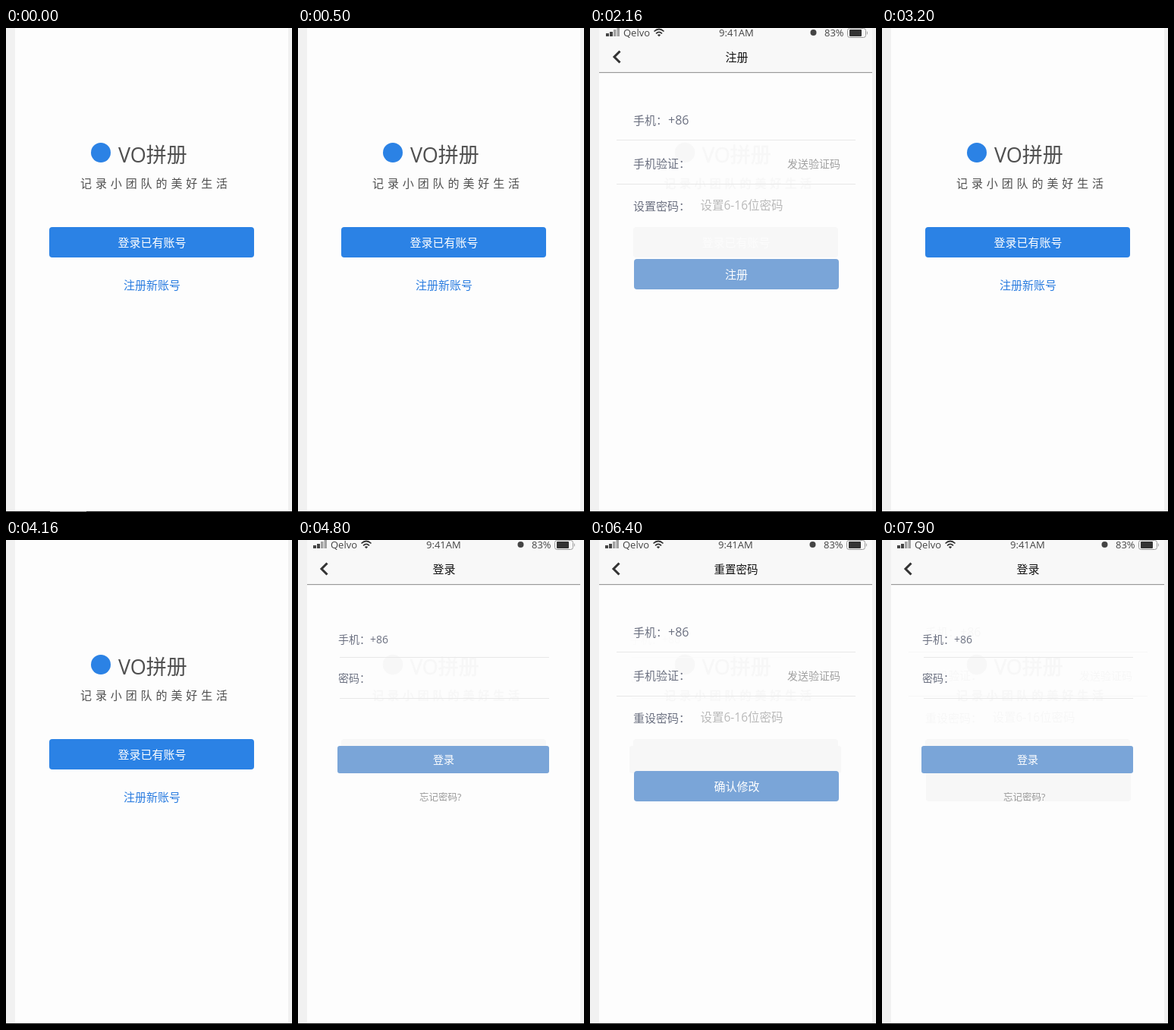
These frames come from a looping animation (377 px wide and 637 px high, 8 s). An HTML page:

```html
<!DOCTYPE html>
<html lang="zh-CN">
<head>
<meta charset="utf-8">
<title>账本</title>
<style>
  html, body { margin: 0; width: 100%; height: 100%; overflow: hidden; background: #f1f1f1; }
  svg { display: block; width: 377px; height: 637px; }
  text { font: 15px "Open Sans", "Noto Sans CJK SC", "Noto Sans CJK", sans-serif; }
  .mid { text-anchor: middle; }

  /* --g recolours a whole group as a faint afterimage */
  .ghost { --g: #f7f7f7; }
  .faint { --g: #fafafa; }
  .mark { fill: var(--g, #2b82e5); }
  .ink { fill: var(--g, #4f4f4f); }
  .brand { font-size: 27px; }
  .motto { letter-spacing: 4.9px; }
  .label { fill: var(--g, #6b7080); }
  .hint { fill: var(--g, #b9b9b9); }
  .code { fill: var(--g, #a0a0a0); font-size: 14px; }
  .rule { stroke: var(--g, #e8e8e8); }
  .soft { fill: var(--g, #7aa5d8); }
  .white { fill: #fff; }
  .title { fill: #111; text-anchor: middle; }
  .small { font-size: 13px; fill: #444; }
  .s14 { font-size: 14px; }

  .screen, .tab { visibility: hidden; animation: 8s step-end infinite; }
  #home { animation-name: home; }
  #register { animation-name: register; }
  #login { animation-name: login; }
  #reset { animation-name: reset; }
  .after { visibility: hidden; animation: after 8s step-end infinite; }
  .tab { animation-name: tab; }
  @keyframes home { 0%, 40% { visibility: visible } 7.5%, 60%, 100% { visibility: hidden } }
  @keyframes register { 0%, 40%, 100% { visibility: hidden } 7.5% { visibility: visible } }
  @keyframes login { 0%, 80% { visibility: hidden } 60%, 98.75%, 100% { visibility: visible } }
  @keyframes reset { 0%, 98.75%, 100% { visibility: hidden } 80% { visibility: visible } }
  @keyframes after { 0% { visibility: hidden } 98.75%, 100% { visibility: visible } }
  @keyframes tab { 0% { visibility: visible } 6.25%, 100% { visibility: hidden } }
</style>
</head>
<body>
<svg viewBox="0 0 377 637">
  <defs>
    <g id="brand">
      <circle class="mark" cx="125" cy="164" r="13"/>
      <text class="ink brand" x="148" y="177">VO拼册</text>
      <text class="ink motto" x="98" y="210">记录小团队的美好生活</text>
    </g>
    <rect id="enter" class="mark" x="57" y="262" width="270" height="40" rx="4"/>
    <g id="trace" class="ghost">
      <use href="#brand" stroke="#f7f7f7" stroke-width=".6"/>
      <use href="#enter"/>
    </g>

    <g id="bar">
      <path d="M12 0H372V58H12z" fill="#f8f8f8"/>
      <path d="M12 58.5H372" stroke="#999"/>
      <path d="M12 59.5H372" stroke="#eee"/>
    </g>
    <g id="status">
      <path d="M20 7h4v4h-4zM25 5h4v6h-4z" fill="#444"/>
      <path d="M30 2h3.5v9H30zM34.500 0h3.500v11h-3.500z" fill="#a2a2a2"/>
      <text class="small" x="43" y="11">Qelvo</text>
      <g fill="none" stroke="#333" stroke-width="1.700">
        <path d="M83.500 4.500Q90 -1.500 96.500 4.500M86 7.300Q90 3.600 94 7.300"/>
      </g>
      <path d="M87.800 9Q90 7.300 92.200 9L90 11.200z" fill="#333"/>
      <text class="small" x="169" y="11">9:41AM</text>
      <circle cx="293.500" cy="6" r="4" fill="#444"/>
      <text class="small" x="308" y="10.500">83%</text>
      <rect x="338.500" y=".5" width="24" height="12" rx="3" fill="none" stroke="#999"/>
      <rect x="341" y="2" width="16" height="9" rx="1" fill="#333"/>
      <path d="M364 4q2 2.500 0 5z" fill="#999"/>
      <path d="M38.500 30.500L31 38l7.500 7.500" fill="none" stroke="#333" stroke-width="3"/>
    </g>

    <g id="fields">
      <text class="label" x="57" y="127">手机：</text>
      <text class="label" x="103" y="127" style="font-size:16px">+86</text>
      <path class="rule" d="M35 147.500H350M35 205.500H350"/>
      <text class="label" x="57" y="184">手机验证：</text>
      <text class="code" x="260" y="184">发送验证码</text>
      <text class="hint" x="145.500" y="239" style="font-size:15.500px">设置6-16位密码</text>
    </g>
    <rect id="submit" class="soft" x="58" y="304" width="270" height="40" rx="4"/>

    <g id="account">
      <text class="label s14" x="53" y="136">手机：+86</text>
      <path class="rule" d="M55 154.500H331M55 208.500H331"/>
      <text class="label s14" x="53" y="187">密码：</text>
    </g>
    <rect id="signin" class="soft" x="52" y="271" width="279" height="36" rx="3"/>
  </defs>

  <path d="M12 0H372V636H12z" fill="#fdfdfd"/>

  <g id="home" class="screen">
    <use href="#brand"/>
    <use href="#enter"/>
    <text class="white mid" x="192.500" y="288">登录已有账号</text>
    <text class="mid" x="192.500" y="344" fill="#2b7de0">注册新账号</text>
  </g>

  <g id="register" class="screen">
    <use href="#trace"/>
    <text class="mid" x="192.500" y="288" fill="#fcfcfc">登录已有账号</text>
    <use href="#bar"/>
    <use href="#status" x="1"/>
    <text class="title" x="193.500" y="44">注册</text>
    <use href="#fields"/>
    <text class="label" x="57" y="240">设置密码：</text>
    <use href="#submit"/>
    <text class="white mid" x="193" y="330">注册</text>
  </g>

  <g id="login" class="screen">
    <use href="#trace"/>
    <g class="after">
      <g class="ghost">
        <use href="#fields"/>
        <text class="label" x="57" y="240">重设密码：</text>
        <use href="#submit"/>
      </g>
    </g>
    <use href="#bar"/>
    <use href="#status"/>
    <text class="title" x="192.500" y="44">登录</text>
    <use href="#account"/>
    <use href="#signin"/>
    <text class="white mid s14" x="192" y="294">登录</text>
    <text x="160" y="343" fill="#999" style="font-size:12.500px">忘记密码?</text>
  </g>

  <g id="reset" class="screen">
    <use href="#trace"/>
    <g class="faint"><use href="#account"/></g>
    <g class="ghost"><use href="#signin"/></g>
    <use href="#bar"/>
    <use href="#status"/>
    <text class="title" x="192.500" y="44" style="font-size:14.500px">重置密码</text>
    <use href="#fields"/>
    <text class="label" x="57" y="240">重设密码：</text>
    <use href="#submit"/>
    <text class="white mid" x="193.500" y="330">确认修改</text>
  </g>

  <path d="M0 636.500H377" stroke="#222"/>
  <path class="tab" d="M58 636.500H106" stroke="#777"/>
</svg>
</body>
</html>
```
